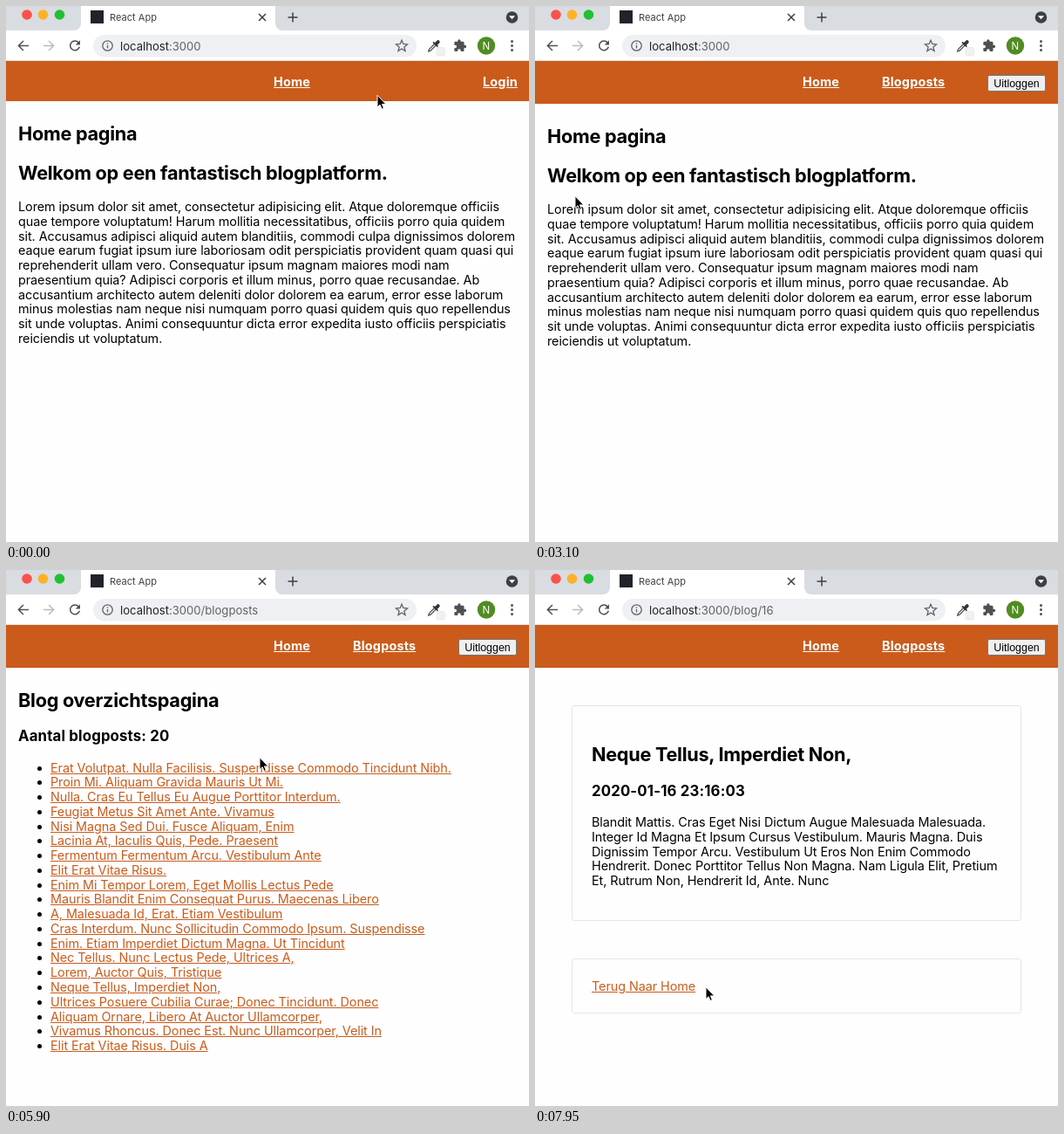
These frames come from a looping animation (600x614 px, 8000 ms). An HTML page:

```html
<!DOCTYPE html>
<html lang="nl">
<head>
<meta charset="utf-8">
<title>Blogplatform</title>
<style>
  html, body { margin: 0; width: 100%; height: 100%; overflow: hidden; }
  body { position: relative; background: #fefdff; color: #000; font: 14.4px Inter, sans-serif; letter-spacing: -.068px; }
  svg { position: absolute; left: 0; top: 0; width: 600px; height: 614px; }
  /* With no line height, "top" is the vertical centre of the capitals. */
  .text { position: absolute; line-height: 0; white-space: nowrap; }
  .h2 { font-size: 21.7px; font-weight: 700; letter-spacing: -.29px; }
  .h3 { font-size: 16.8px; font-weight: 700; letter-spacing: .15px; }
  .tab { font-size: 11px; letter-spacing: .03px; color: #3c4043; }
  .url { font-size: 13.1px; letter-spacing: 0; color: #202124; }
  .url span { color: #5f6368; }
  a { color: #c95c1a; text-decoration: underline; }
  .nav a { color: #fff; font-weight: 700; letter-spacing: .2px; }
  #bar { position: absolute; left: 0; top: 63px; width: 600px; background: #ca5b1b; }
  .bullet { position: absolute; width: 5px; height: 5px; border-radius: 50%; background: #000; }
  .card { position: absolute; left: 42px; width: 514px; border: 1px solid #e7e5e8; border-radius: 3px; }
  button { position: absolute; box-sizing: border-box; height: 19px; padding: 0; border: 1px solid #767676; border-radius: 2.5px;
    background: #efefef; color: #000; font: 12.4px "Liberation Sans", Arial, sans-serif; letter-spacing: 0; }
  button.hover { background: #dddde0; border-color: #4f4f4f; }
  button.pressed { background: #f5f5f5; border-color: #8d8d8d; }
  #pointer { pointer-events: none; }
</style>
</head>
<body>
<svg viewBox="0 0 600 614" fill="none" stroke-width="1.5">
  <path fill="#d9dce1" d="M0 0H600V28H0z"/>
  <path fill="#fff" d="M0 28H600V63H0zM78 28a8 8 0 0 0 8-8V0H309V20a8 8 0 0 0 8 8z"/>
  <path fill="#dadce0" d="M0 62.2H600V63H0z"/>
  <circle cx="24" cy="10" r="5.8" fill="#fc504b"/>
  <circle cx="42.5" cy="10" r="5.8" fill="#fdb226"/>
  <circle cx="61.5" cy="10" r="5.8" fill="#20c033"/>
  <rect x="97" y="5" width="15" height="15" fill="#20232a"/>
  <path stroke="#3c4043" d="M290 9l8 8M298 9l-8 8M329 7.5v11M323.5 13h11"/>
  <circle cx="580.5" cy="13" r="6.8" fill="#3c4043"/>
  <path fill="#fff" d="M577 11.3h7l-3.5 4z"/>
  <rect x="100" y="33" width="371" height="25.5" rx="12.7" fill="#eff0f3"/>
  <path stroke="#4d5156" d="M26 45.5H14.5M20 40l-5.6 5.5 5.6 5.5"/>
  <path stroke="#babcbe" d="M43 45.5H54.5M49 40l5.6 5.5-5.6 5.5"/>
  <path stroke="#4d5156" d="M83.3 42a5.4 5.4 0 1 0 1 4.7"/>
  <path fill="#4d5156" d="M85 39.3v5.3h-5.3z"/>
  <g stroke="#5f6368" stroke-width="1.3">
    <circle cx="116.5" cy="45.5" r="5.7"/>
    <path d="M116.5 44.8v3.7M116.5 42.2v1.4"/>
    <path d="M454 39.2l1.8 4.3 4.7.4-3.6 3 1.1 4.6-4-2.5-4 2.5 1.1-4.6-3.6-3 4.7-.4z"/>
  </g>
  <rect x="494" y="47.5" width="9.5" height="9.5" rx="2" fill="#f1f1f2" stroke="#e4e4e6" stroke-width=".7"/>
  <path stroke="#4d5156" stroke-width="1.3" d="M491.5 43.5l-6 6-.8 2.4 2.4-.8 6-6"/>
  <path stroke="#33363a" stroke-width="4" stroke-linecap="round" d="M493.5 43.3l2.2-2.2"/>
  <path stroke="#33363a" stroke-width="1.8" d="M490 41.3l5.4 5.4"/>
  <path fill="#4d5156" transform="translate(513 37.5) scale(.66)" d="M20.5 11H19V7c0-1.1-.9-2-2-2h-4V3.5a2.5 2.5 0 0 0-5 0V5H4c-1.1 0-2 .9-2 2v3.8h1.5a2.7 2.7 0 0 1 0 5.4H2V20c0 1.1.9 2 2 2h3.8v-1.5a2.7 2.7 0 0 1 5.4 0V22H17c1.1 0 2-.9 2-2v-4h1.5a2.5 2.5 0 0 0 0-5z"/>
  <circle cx="551" cy="45.5" r="10.2" fill="#518c22"/>
  <g fill="#4d5156"><circle cx="580.5" cy="40.5" r="1.5"/><circle cx="580.5" cy="45.5" r="1.5"/><circle cx="580.5" cy="50.5" r="1.5"/></g>
</svg>
<div class="text tab" style="left:119px;top:13px">React App</div>
<div class="text" style="left:546.5px;top:45.5px;font-size:11.5px;color:#fff">N</div>
<div class="text url" style="left:131px;top:45.5px">localhost<span>:3000<span id="path"></span></span></div>
<div id="bar"></div>
<div id="page"></div>
<svg id="pointer" viewBox="0 0 600 614">
  <circle id="ring" r="29" fill="none" stroke="#111" stroke-width="1.5"/>
  <path id="arrow" fill="#000" stroke="#fff" stroke-linejoin="round" d="M0-.3V13.6l3.1-2.9 2 4.7 2.3-1-2-4.5H9.9z"/>
  <path id="hand" fill="#fff" stroke="#111" stroke-width="1.1" stroke-linejoin="round" d="M-1.7 8.5V1.5a1.5 1.5 0 0 1 3 0V6c.4-1.2 2.6-1 2.8.4.6-.9 2.4-.6 2.5.7.7-.7 2-.2 2 1v2.8c0 1.8-1.4 2.8-1.4 4.9H.2c-.2-2-2.2-3.6-3.4-5.6-.8-1.2-2-2.2-1.3-2.9.9-.8 2.2.1 2.8 1.2z"/>
</svg>
<script>
const $ = id => document.getElementById(id);
const LINE = 16.76;

const text = (x, y, content, cls = '') =>
  `<div class="text ${cls}" style="left:${x}px;top:${y}px">${content}</div>`;
const link = label => `<a>${label}</a>`;
const lines = (x, y, content) =>
  content.trim().split('\n').map((row, i) => text(x, y + i * LINE, row)).join('');
const button = (x, y, width, label) =>
  `<button style="left:${x}px;top:${y}px;width:${width}px">${label}</button>`;
const card = (top, height) => `<div class="card" style="top:${top}px;height:${height}px"></div>`;

const intro = `
Lorem ipsum dolor sit amet, consectetur adipisicing elit. Atque doloremque officiis
quae tempore voluptatum! Harum mollitia necessitatibus, officiis porro quia quidem
sit. Accusamus adipisci aliquid autem blanditiis, commodi culpa dignissimos dolorem
eaque earum fugiat ipsum iure laboriosam odit perspiciatis provident quam quasi qui
reprehenderit ullam vero. Consequatur ipsum magnam maiores modi nam
praesentium quia? Adipisci corporis et illum minus, porro quae recusandae. Ab
accusantium architecto autem deleniti dolor dolorem ea earum, error esse laborum
minus molestias nam neque nisi numquam porro quasi quidem quis quo repellendus
sit unde voluptas. Animi consequuntur dicta error expedita iusto officiis perspiciatis
reiciendis ut voluptatum.`;

const titles = `Erat Volutpat. Nulla Facilisis. Suspendisse Commodo Tincidunt Nibh.
Proin Mi. Aliquam Gravida Mauris Ut Mi.
Nulla. Cras Eu Tellus Eu Augue Porttitor Interdum.
Feugiat Metus Sit Amet Ante. Vivamus
Nisi Magna Sed Dui. Fusce Aliquam, Enim
Lacinia At, Iaculis Quis, Pede. Praesent
Fermentum Fermentum Arcu. Vestibulum Ante
Elit Erat Vitae Risus.
Enim Mi Tempor Lorem, Eget Mollis Lectus Pede
Mauris Blandit Enim Consequat Purus. Maecenas Libero
A, Malesuada Id, Erat. Etiam Vestibulum
Cras Interdum. Nunc Sollicitudin Commodo Ipsum. Suspendisse
Enim. Etiam Imperdiet Dictum Magna. Ut Tincidunt
Nec Tellus. Nunc Lectus Pede, Ultrices A,
Lorem, Auctor Quis, Tristique
Neque Tellus, Imperdiet Non,
Ultrices Posuere Cubilia Curae; Donec Tincidunt. Donec
Aliquam Ornare, Libero At Auctor Ullamcorper,
Vivamus Rhoncus. Donec Est. Nunc Ullamcorper, Velit In
Elit Erat Vitae Risus. Duis A`.split('\n');

const article = `
Blandit Mattis. Cras Eget Nisi Dictum Augue Malesuada Malesuada.
Integer Id Magna Et Ipsum Cursus Vestibulum. Mauris Magna. Duis
Dignissim Tempor Arcu. Vestibulum Ut Eros Non Enim Commodo
Hendrerit. Donec Porttitor Tellus Non Magna. Nam Ligula Elit, Pretium
Et, Rutrum Non, Hendrerit Id, Ante. Nunc`;

const home = shift =>
  text(14, 146 + shift, 'Home pagina', 'h2') +
  text(14, 190.5 + shift, 'Welkom op een fantastisch blogplatform.', 'h2') +
  lines(14, 230 + shift, intro);

const login =
  text(14, 146, 'Login pagina', 'h2') +
  text(14, 185.5, 'Druk op de knop om je in te loggen!') +
  button(14, 209, 62, 'Inloggen');

const overview =
  text(14, 149, 'Blog overzichtspagina', 'h2') +
  text(14, 190, 'Aantal blogposts: 20', 'h3') +
  titles.map((title, i) => {
    const y = 226.6 + i * LINE;
    return `<div class="bullet" style="left:35.5px;top:${y - 2}px"></div>` + text(51, y, link(title));
  }).join('');

const post =
  card(155, 245) + card(445, 61) +
  text(65, 211, 'Neque Tellus, Imperdiet Non,', 'h2') +
  text(65, 252.5, '2020-01-16 23:16:03', 'h3') +
  lines(65, 289, article) +
  text(65, 477, link('Terug Naar Home'));

const nav = loggedIn => text(307, 87, link('Home'), 'nav') + (loggedIn
  ? text(398, 87, link('Blogposts'), 'nav') + button(519, 79, 67, 'Uitloggen')
  : text(547, 87, link('Login'), 'nav'));

const DURATION = 8000;
const pages = [
  { start: 0, path: '', body: home(0) },
  { start: 750, path: '/login', body: login },
  { start: 3100, path: '', body: home(3), loggedIn: true },
  { start: 5000, path: '/blogposts', body: overview, loggedIn: true },
  { start: 7700, path: '/blog/16', body: post, loggedIn: true },
];
const clicks = [[550, 750], [2750, 2950], [4800, 5000], [7550, 7700]];
const track = [ // time, x, y
  [0, 426, 102.5], [500, 571, 84], [880, 571, 84], [1650, 57, 210], [2000, 46, 218],
  [3380, 46, 218], [4600, 420, 83], [5080, 420, 83], [5850, 291, 215], [5950, 291, 215],
  [6750, 217, 413], [7500, 196, 478], [DURATION, 196, 478],
];

function pointerAt(time) {
  const next = track.findIndex(key => key[0] > time);
  const [t0, x0, y0] = track[next - 1], [t1, x1, y1] = track[next];
  const u = (time - t0) / (t1 - t0), ease = u * u * (3 - 2 * u);
  return [x0 + (x1 - x0) * ease, y0 + (y1 - y0) * ease];
}

let shown;
function showPage(page) {
  if (page === shown) return;
  shown = page;
  $('path').textContent = page.path;
  $('bar').style.height = (page.loggedIn ? 49 : 46) + 'px';
  $('page').innerHTML = nav(page.loggedIn) + page.body;
}

function place(id, x, y, visible) {
  $(id).setAttribute('transform', `translate(${x} ${y})`);
  $(id).style.display = visible ? '' : 'none';
}

function draw(time) {
  showPage(pages.findLast(page => page.start <= time));
  const [x, y] = pointerAt(time);
  const target = document.elementFromPoint(x, y);
  const onLink = !!target?.closest('a');
  const clicking = clicks.some(([from, to]) => time >= from && time < to);
  place('arrow', x, y, !onLink);
  place('hand', x, y, onLink);
  place('ring', onLink ? x : x + 2, onLink ? y - 1 : y - 8, clicking);
  for (const item of document.querySelectorAll('button')) {
    item.className = item !== target ? '' : clicking ? 'pressed' : 'hover';
  }
}

const began = performance.now();
function frame() {
  draw((performance.now() - began) % DURATION);
  requestAnimationFrame(frame);
}
frame();
</script>
</body>
</html>
```
